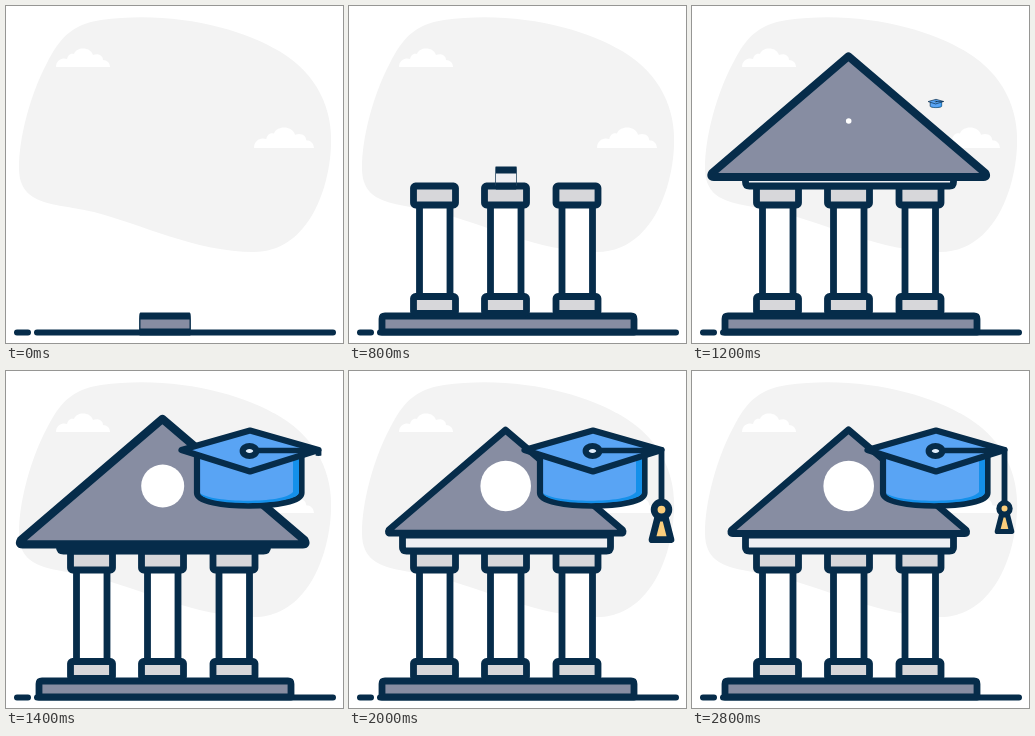
Animation of 337x337 px, one loop 3000 ms. Source, as an HTML page:

```html
<!DOCTYPE html>
<html lang="en">
<head>
<meta charset="utf-8">
<title>University building</title>
<style>
  html, body { margin: 0; width: 100%; height: 100%; overflow: hidden; background: #fff; }
  svg { display: block; width: 100vw; height: 100vh; }
  .ink { stroke: #062c4a; stroke-width: 6.8; stroke-linecap: round; stroke-linejoin: round; fill: none; }
  .stone { fill: #d7d7da; }
  .slate { fill: #878da2; }
  .white { fill: #fff; }
</style>
</head>
<body>
<svg viewBox="0 0 337 337">
  <defs>
    <path id="cloud" class="white" d="M0 0C0-6 5-10 11-8C12-13 16-14 18-13C20-20 34-21 37-12C43-14 47-11 47-7C51-7 54-4 54 0Z"/>
    <rect id="shaft" class="white" x="-14.500" y="198" width="30.500" height="93"/>
    <rect id="foot" class="stone" x="-20.500" y="290.500" width="42" height="17" rx="2"/>
    <rect id="capital" class="stone" x="-20.500" y="180" width="42" height="19" rx="2"/>
  </defs>

  <path fill="#f3f3f3" d="M95 14C165 4 235 22 273 45C312 68 327 104 325 140C323 187 300 246 248 246C190 246 135 218 88 206C50 197 13 201 13 162C13 130 25 87 41 57C53 33 66 18 95 14Z"/>
  <use href="#cloud" x="50" y="61"/>
  <use href="#cloud" transform="translate(248 142) scale(1.11)"/>

  <g class="ink">
    <path d="M11 326.500H22M31 326.500H327" stroke-width="6"/>
    <path id="base" class="slate" d="M33 326V313Q33 310 36 310H282Q285 310 285 313V326Z"/>
    <g id="shafts"></g>
    <g id="feet"></g>
    <g id="capitals"></g>
    <path id="beam" fill="#eeeff3" d="M53.500 164H261.500V176Q261.500 180 257.500 180H57.500Q53.500 180 53.500 176Z"/>
    <path id="roof" class="slate" d="M156.500 58.800L39.500 159Q37.500 162.500 41 162.500H272.500Q276 162.500 274 159Z"/>
    <circle id="window" class="white" stroke="none" cx="156.700" cy="115" r="25.300"/>
    <g id="cap" stroke-width="6.200">
      <path fill="#59a4f4" d="M191 82V122C191 139 295.500 139 295.500 122V82Z"/>
      <path fill="#1490ea" stroke="none" d="M194 122C205 132 278 133 287 121V89L293 87V122C289 135 198 136 194 122Z"/>
      <path fill="#59a4f4" d="M175.500 79L244 59.500L312.500 79L244 100.500Z"/>
      <ellipse fill="#e3effc" cx="243.500" cy="80" rx="6.800" ry="5"/>
      <path stroke-width="5.500" d="M252 79.500H312"/>
    </g>
    <path id="cord" d="M312.500 79V135" stroke-width="5.800"/>
    <g id="tassel" fill="#fbce7c" stroke-width="5.200">
      <path d="M309.500 144H315.500L319.700 160.500H305.300Z"/>
      <circle cx="312.500" cy="137.500" r="5.600"/>
    </g>
  </g>
</svg>
<script>
const byId = id => document.getElementById(id);

for (const [group, shape] of [["shafts", "shaft"], ["feet", "foot"], ["capitals", "capital"]])
  byId(group).innerHTML = [85, 156, 227.5].map(x => `<use href="#${shape}" x="${x}"/>`).join("");

// id, scaled axes, pivot x, pivot y, start in ms, scale at each following 100 ms
const parts = [
  ["base", "x", 159, 326, 0, [.2, .6, 1]],
  ["feet", "y", 157, 308, 200, [.1, .55, 1]],
  ["shafts", "y", 157, 292, 400, [.11, .55, 1]],
  ["capitals", "y", 157, 201, 600, [.1, .55, 1]],
  ["beam", "x", 157, 172, 800, [.1, .55, 1]],
  ["roof", "xy", 157, 110.5, 1000, [.1, .7, 1.165, 1.29, 1.21, 1.11, 1.035, 1, .99, .99, .995, 1]],
  ["window", "xy", 156.7, 115, 1200, [.11, .5, .85, 1]],
  ["cap", "xy", 244, 97.5, 1200, [.11, .55, 1]],
  ["cord", "y", 312, 79, 1400, [.1, .55, 1]],
  ["tassel", "xy", 312.5, 134, 1600, [.12, .75, 1.25, 1.45, 1.31, 1.16, 1.06, 1.02, 1]],
];

function draw(now) {
  const time = Math.min(now % 3000, 2800);
  for (const [id, axes, x, y, start, scales] of parts) {
    const step = Math.floor((time - start) / 100);
    const scale = scales[Math.min(step, scales.length - 1)];
    const sx = axes.includes("x") ? scale : 1;
    const sy = axes.includes("y") ? scale : 1;
    const el = byId(id);
    el.style.display = step < 0 ? "none" : "";
    if (step >= 0)
      el.setAttribute("transform", `translate(${x} ${y}) scale(${sx} ${sy}) translate(${-x} ${-y})`);
  }
}

const origin = performance.now();
function tick() {
  draw(performance.now() - origin);
  requestAnimationFrame(tick);
}
tick();
</script>
</body>
</html>
```
